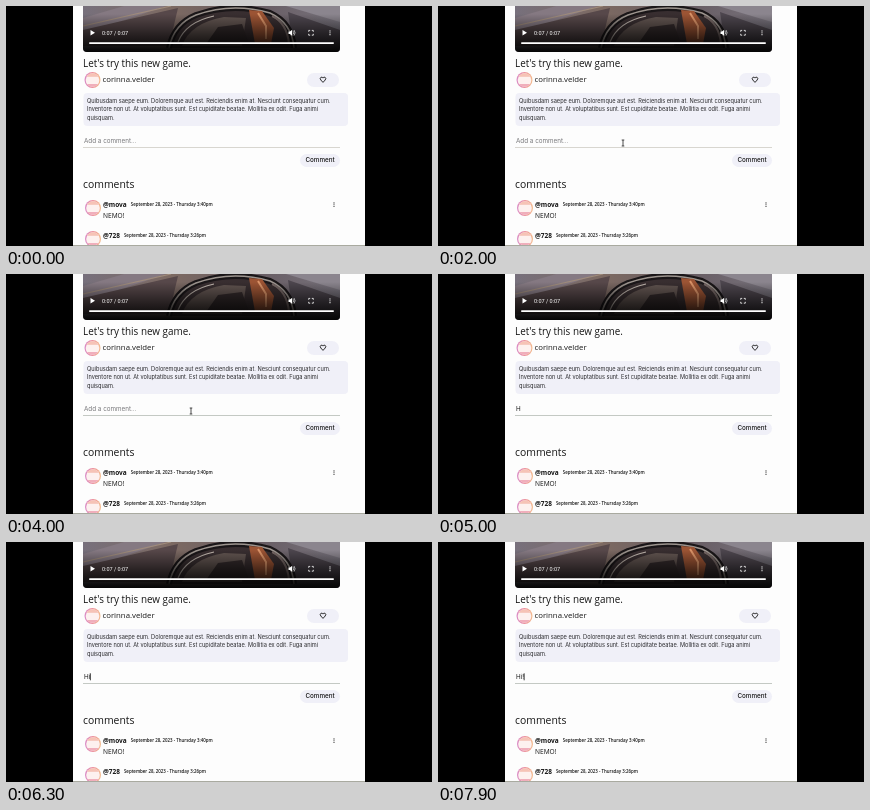
Animation, 426 px wide and 240 px high, one loop 8000 ms. Source, as an HTML page with a canvas:

```html
<!DOCTYPE html>
<html lang="en">
<head>
<meta charset="utf-8">
<title>Comment box</title>
<style>
html, body { margin: 0; width: 100%; height: 100%; overflow: hidden; background: #000; }
canvas { display: block; width: 426px; height: 240px; }
</style>
</head>
<body>
<canvas id="stage"></canvas>
<script>
const W = 426, H = 240, LOOP = 8000;
const canvas = document.getElementById('stage');
const ratio = window.devicePixelRatio || 1;
canvas.width = W * ratio;
canvas.height = H * ratio;
const c = canvas.getContext('2d');
const UI = 'Inter, "Liberation Sans", sans-serif';
const HAND = '"Open Sans", "Noto Sans", sans-serif';
const INK = '#161616', PILL = '#f0f0f8';

function rect(x, y, w, h, fill) {
  c.fillStyle = fill;
  c.fillRect(x, y, w, h);
}

function round(x, y, w, h, r, fill) {
  c.beginPath();
  c.roundRect(x, y, w, h, r);
  c.fillStyle = fill;
  c.fill();
}

function text(s, x, y, size, family, color = INK, weight = 400) {
  c.font = `${weight} ${size}px ${family}`;
  c.fillStyle = color;
  c.fillText(s, x, y);
  return c.measureText(s).width;
}

function path(d, fill, stroke, width = 1) {
  const p = new Path2D(d);
  if (fill) { c.fillStyle = fill; c.fill(p); }
  if (stroke) { c.strokeStyle = stroke; c.lineWidth = width; c.stroke(p); }
}

function disc(x, y, r, fill) {
  c.beginPath();
  c.arc(x, y, r, 0, Math.PI * 2);
  c.fillStyle = fill;
  c.fill();
}

function dots(x, y, gap, r, color) {
  for (let i = -1; i <= 1; i++) disc(x, y + i * gap, r, color);
}

function gradient(x0, y0, x1, y1, ...colors) {
  const g = c.createLinearGradient(x0, y0, x1, y1);
  colors.forEach((col, i) => g.addColorStop(i / (colors.length - 1), col));
  return g;
}

function drawScene() {
  rect(77, 0, 257, 46, gradient(77, 0, 334, 0, '#77707c', '#7d6a62', '#675c62', '#77727c'));
  path('M77 12L118 0H160L77 28Z', '#857982');
  path('M77 24L172 2L163 40H77Z', '#57484a');
  path('M77 20L165 0', null, '#a08c7c', 1.2);
  path('M280 0H334V16Z', '#8b858e');
  path('M282 6L334 24V46H288Z', '#4d464e');

  const dome = 'M163 42Q168 18 190 9Q226 -4 264 7Q286 17 288 42';
  path(dome, '#382e30', '#1a1618', 6);
  path(dome, null, '#9c948e', 1.6);
  path('M176 40Q184 17 218 11L240 12L236 40Z', '#615450');
  path('M172 36Q180 16 208 10', null, '#c0b6ae', 1.2);
  path('M200 38L212 21L236 18L243 38Z', '#332a2b');
  path('M243 4L256 5L268 22L265 38H249Z', '#9c5434');
  path('M252 7L260 20V33', null, '#dc9468', 2);
  path('M266 10Q281 17 283 38', null, '#756664', 2);
}

function drawVideo() {
  c.save();
  c.beginPath();
  c.roundRect(77, -10, 257, 56, 4);
  c.clip();
  drawScene();
  rect(77, 0, 257, 46, gradient(0, 8, 0, 46, 'rgba(0,0,0,0)', 'rgba(0,0,0,.5)', '#050505'));

  path('M84.5 24V29.5L89 26.75Z', '#fff');
  text('0:07 / 0:07', 96, 28.8, 5.5, 'Roboto, "Liberation Sans", sans-serif', '#fff');
  path('M282.5 25.6H284L286.2 23.7V29.9L284 28H282.5Z', '#fff');
  path('M287.2 25.2Q288.3 26.8 287.2 28.4M288 24Q290.2 26.8 288 29.6', null, '#fff', .6);
  path('M302.7 25.8V24.4H304.2M305.8 24.4H307.3V25.8M307.3 27.8V29.2H305.8M304.2 29.2H302.7V27.8', null, '#fff', .8);
  dots(324, 26.8, 1.9, .6, '#fff');
  round(83, 36.2, 245, 1.8, 1, '#fff');
  c.restore();
}

function avatar(x, y, r) {
  disc(x, y, r, gradient(x - r, y, x + r, y, '#d98cc8', '#ec8f9c', '#f3bd8e'));
  disc(x, y, r - 1.2, '#fdf1ef');
  c.save();
  c.beginPath();
  c.arc(x, y, r - 1.2, 0, Math.PI * 2);
  c.clip();
  rect(x - r, y - r, 2 * r, r * .6, '#f6c3b6');
  rect(x - r, y + r * .5, 2 * r, r, '#f0aebb');
  c.restore();
}

function comment(y, name, time) {
  avatar(87, y, 8);
  const w = text(name, 97, y - 1.5, 6.5, HAND, INK, 700);
  text('September 28, 2023 - Thursday ' + time, 97 + w + 4, y - 2.2, 4.4, HAND, INK, 600);
}

function drawPage() {
  rect(0, 0, W, H, '#000');
  rect(67, 0, 292, H, '#fdfdfd');
  drawVideo();
  text("Let's try this new game.", 77, 60.5, 9.9, HAND, INK, 500);

  avatar(86.5, 74, 8);
  text('corinna.velder', 96.5, 76.3, 7.8, HAND, INK, 500);
  round(301, 67, 32, 14, 7, PILL);
  path('M317 76.4L314.8 74Q313.4 72 315.1 71.2Q316.3 70.8 317 72.1Q317.7 70.8 318.9 71.2Q320.6 72 319.2 74Z', null, INK, .9);

  round(77.5, 87, 264.5, 33, 4, PILL);
  [
    'Quibusdam saepe eum. Doloremque aut est. Reiciendis enim at. Nesciunt consequatur cum.',
    'Inventore non ut. At voluptatibus sunt. Est cupiditate beatae. Mollitia ex odit. Fuga animi',
    'quisquam.'
  ].forEach((line, i) => text(line, 81, 96.8 + i * 8.6, 5.62, UI, '#29292c'));

  round(294, 148, 40, 13, 6.5, PILL);
  c.textAlign = 'center';
  text('Comment', 314, 156.2, 6.3, UI, INK, 500);
  c.textAlign = 'left';

  text('comments', 77, 181.5, 10.4, HAND, INK, 500);
  comment(202, '@mova', '3:40pm');
  text('NEMO!', 97, 212.3, 6.6, HAND, INK, 500);
  dots(328, 198.7, 1.8, .55, INK);
  comment(233, '@728', '3:26pm');
  rect(67, 239, 292, 1, '#a9aaa0');
}

// Each edit restarts the caret blink.
const edits = [[2400, ''], [4500, 'H'], [5200, 'Hi'], [6700, 'Hi!']];

function drawInput(t) {
  const edit = edits.filter(e => e[0] <= t).pop();
  rect(77, 141, 257, 1, edit ? '#c4c9c4' : '#d8d6d0');
  const value = edit ? edit[1] : '';
  if (!value) text('Add a comment...', 78, 137, 6.3, UI, '#77777a');
  const w = value ? text(value, 78, 137, 6.3, UI) : 0;
  if (edit && (t - edit[0]) % 1000 < 500) rect(77.7 + w, 131.3, .8, 7, '#111');
}

function ease(t, a, b) {
  const p = Math.min(1, Math.max(0, (t - a) / (b - a)));
  return p * p * (3 - 2 * p);
}

function drawPointer(t) {
  if (t < 700 || t >= 4500) return;
  const enter = ease(t, 700, 1050), rise = ease(t, 1500, 2000);
  const x = 196 - 12 * enter + rise;
  const y = 174 - 25 * enter - 12 * rise;
  c.save();
  c.translate(x, y);
  if (y < 142) {
    path('M-1.3 -3H1.3M0 -3V3M-1.3 3H1.3', null, '#222', .8);
  } else {
    path('M0 0V5.6L1.3 4.4L2.2 6.4L3.2 6L2.3 4H4Z', '#111', '#fff', .4);
  }
  c.restore();
}

function frame(now) {
  const t = now % LOOP;
  c.setTransform(ratio, 0, 0, ratio, 0, 0);
  drawPage();
  drawInput(t);
  drawPointer(t);
  requestAnimationFrame(frame);
}
frame(0);
</script>
</body>
</html>
```
